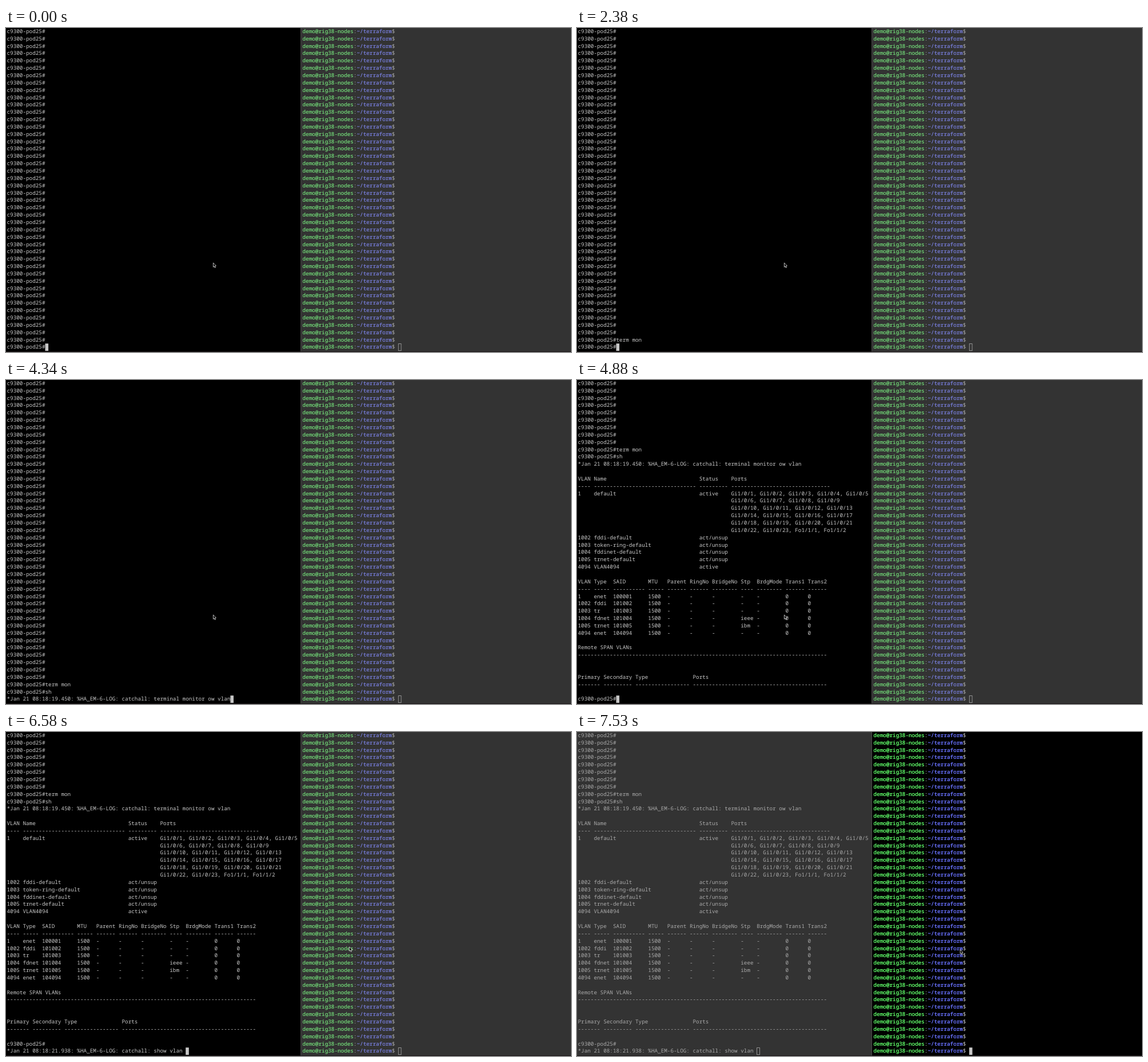
Recreate the animation shown at these times as an HTML page with a canvas. Size 988 by 567 pixels, loop 8 s.

```html
<!DOCTYPE html>
<html lang="en">
<head>
<meta charset="utf-8">
<title>Split terminal</title>
<style>
html, body { margin: 0; width: 988px; height: 567px; overflow: hidden; background: #000; }
canvas { display: block; }
</style>
</head>
<body>
<canvas id="stage" width="988" height="567"></canvas>
<script>
const ctx = document.getElementById('stage').getContext('2d');
const LOOP = 8000, ROWS = 44, CELL = 5.584, LINE = 12.85, TOP = -0.35, SPLIT = 515;
const LEFT_X = 1.5, RIGHT_X = 518.3, BASELINE = 9.2;
const FOCUS_SWAP = 7530;
const COLORS = { bg: [0, 0, 0], text: [199, 199, 199], green: [95, 250, 104], blue: [104, 113, 255] };

const PROMPT = 'c9300-pod25#';
const SHELL = [['demo@rig38-nodes', 'green'], [':', 'text'], ['~/terraform', 'blue'], ['$', 'text']];

// Place words at fixed columns
const row = (cols, words) =>
  words.reduce((line, word, i) => line.padEnd(cols[i]) + word, '');
const rule = (cols, widths) => row(cols, widths.map(n => '-'.repeat(n)));

const nameCols = [0, 5, 38, 48];
const typeCols = [0, 5, 11, 22, 28, 35, 42, 51, 56, 65, 72];
const pvlanCols = [0, 8, 18, 36];

const range = (from, to) =>
  Array.from({ length: to - from + 1 }, (_, i) => 'Gi1/0/' + (from + i)).join(', ');
const ports = text => ' '.repeat(48) + text;
const unsup = (id, name) => row(nameCols, [id, name, 'act/unsup']);
const detail = (id, type, stp = '-') =>
  row(typeCols, [id, type, String(100000 + Number(id)), '1500', '-', '-', '-', stp, '-', '0', '0']);

const vlanTable = [
  '',
  row(nameCols, ['VLAN', 'Name', 'Status', 'Ports']),
  rule(nameCols, [4, 32, 9, 31]),
  row(nameCols, ['1', 'default', 'active', range(1, 5)]),
  ports(range(6, 9)),
  ports(range(10, 13)),
  ports(range(14, 17)),
  ports(range(18, 21)),
  ports(range(22, 23) + ', Fo1/1/1, Fo1/1/2'),
  unsup('1002', 'fddi-default'),
  unsup('1003', 'token-ring-default'),
  unsup('1004', 'fddinet-default'),
  unsup('1005', 'trnet-default'),
  row(nameCols, ['4094', 'VLAN4094', 'active']),
  '',
  row(typeCols, ['VLAN', 'Type', 'SAID', 'MTU', 'Parent', 'RingNo', 'BridgeNo', 'Stp', 'BrdgMode', 'Trans1', 'Trans2']),
  rule(typeCols, [4, 5, 10, 5, 6, 6, 8, 4, 8, 6, 6]),
  detail('1', 'enet'),
  detail('1002', 'fddi'),
  detail('1003', 'tr'),
  detail('1004', 'fdnet', 'ieee'),
  detail('1005', 'trnet', 'ibm'),
  detail('4094', 'enet'),
  '',
  'Remote SPAN VLANs',
  '-'.repeat(78),
  '', '',
  row(pvlanCols, ['Primary', 'Secondary', 'Type', 'Ports']),
  rule(pvlanCols, [7, 9, 17, 42]),
  '',
  PROMPT
].join('\n');

const log = (time, text) => `\n*Jan 21 08:18:${time}: %HA_EM-6-LOG: catchall: ${text}`;

// Terminal stream: [time, characters written]
const output = [
  [0, Array(ROWS).fill(PROMPT).join('\n')],
  [470, 't'], [860, 'er'], [1280, 'm'], [1460, ' '], [1640, 'm'], [1850, 'o'], [2020, 'n'],
  [2380, '\n' + PROMPT],
  [3270, 's'],
  [3630, 'h' + log('19.450', 'terminal monitor ow')],
  [3800, ' '], [3980, 'v'], [4160, 'l'], [4340, 'an'],
  [4880, '\n' + vlanTable],
  [6580, log('21.938', 'show vlan ')]
];

// Pointer tip: [time, x, y]
const pointer = [
  [0, 362, 410.5], [5990, 365.5, 407.8], [6170, 486, 379], [6380, 596, 375.5], [6580, 600, 375.5],
  [6790, 668, 378], [7000, 669, 379.3], [7180, 669.7, 380.3]
];

const tint = (name, active) =>
  `rgb(${COLORS[name].map(v => Math.round(active ? v : v * 0.6 + 51)).join(',')})`;

function print(text, x, line, color, bold) {
  ctx.fillStyle = color;
  const y = TOP + line * LINE + BASELINE;
  [...text].forEach((ch, i) => {
    if (ch === ' ') return;
    ctx.fillText(ch, x + i * CELL, y);
    if (bold) ctx.fillText(ch, x + i * CELL + 0.25, y);
  });
}

function drawCaret(x, active) {
  const y = TOP + (ROWS - 1) * LINE;
  if (active) {
    ctx.fillStyle = tint('text', true);
    ctx.fillRect(x, y, CELL, LINE);
  } else {
    ctx.strokeStyle = tint('text', false);
    ctx.lineWidth = 0.8;
    ctx.strokeRect(x + 0.4, y + 0.4, CELL - 0.8, LINE - 0.8);
  }
}

function drawSwitch(t, active) {
  ctx.fillStyle = tint('bg', active);
  ctx.fillRect(0, 0, SPLIT, 566);
  const text = output.filter(([at]) => at <= t).map(([, chars]) => chars).join('');
  const lines = text.split('\n').slice(-ROWS);
  lines.forEach((line, i) => print(line, LEFT_X, i, tint('text', active)));
  drawCaret(LEFT_X + lines[ROWS - 1].length * CELL, active);
}

function drawShell(active) {
  ctx.fillStyle = tint('bg', active);
  ctx.fillRect(SPLIT + 1, 0, 988 - SPLIT - 1, 566);
  for (let i = 0; i < ROWS; i++) {
    let x = RIGHT_X;
    for (const [text, name] of SHELL) {
      print(text, x, i, tint(name, active), name !== 'text');
      x += text.length * CELL;
    }
  }
  drawCaret(RIGHT_X + 30 * CELL, active);
}

function drawPointer(t) {
  const [, x, y] = pointer.filter(([at]) => at <= t).pop();
  ctx.save();
  ctx.translate(x, y);
  ctx.beginPath();
  [[0.4, 0.4], [0.4, 7.9], [2, 6.4], [3.2, 9.1], [4.4, 8.6], [3.3, 6], [5.4, 5.7]]
    .forEach(p => ctx.lineTo(...p));
  ctx.closePath();
  ctx.fillStyle = '#000';
  ctx.fill();
  ctx.strokeStyle = '#e6e6e6';
  ctx.lineWidth = 0.8;
  ctx.stroke();
  ctx.restore();
}

function draw(t) {
  ctx.font = '9.306px "Noto Sans Mono", "DejaVu Sans Mono", monospace';
  ctx.textRendering = 'geometricPrecision';
  ctx.fillStyle = '#1c1618';
  ctx.fillRect(0, 0, 988, 567);
  const swapped = t >= FOCUS_SWAP;
  drawSwitch(t, !swapped);
  drawShell(swapped);
  ctx.fillStyle = '#484848';
  ctx.fillRect(SPLIT, 0, 1, 566);
  drawPointer(t);
}

const changes = [...output, ...pointer, [FOCUS_SWAP]].map(([at]) => at);
const start = performance.now();
let shown = -1;

function tick() {
  const t = (performance.now() - start) % LOOP;
  const step = Math.max(...changes.filter(at => at <= t));
  if (step !== shown) draw(shown = step);
  requestAnimationFrame(tick);
}
tick();
</script>
</body>
</html>
```
